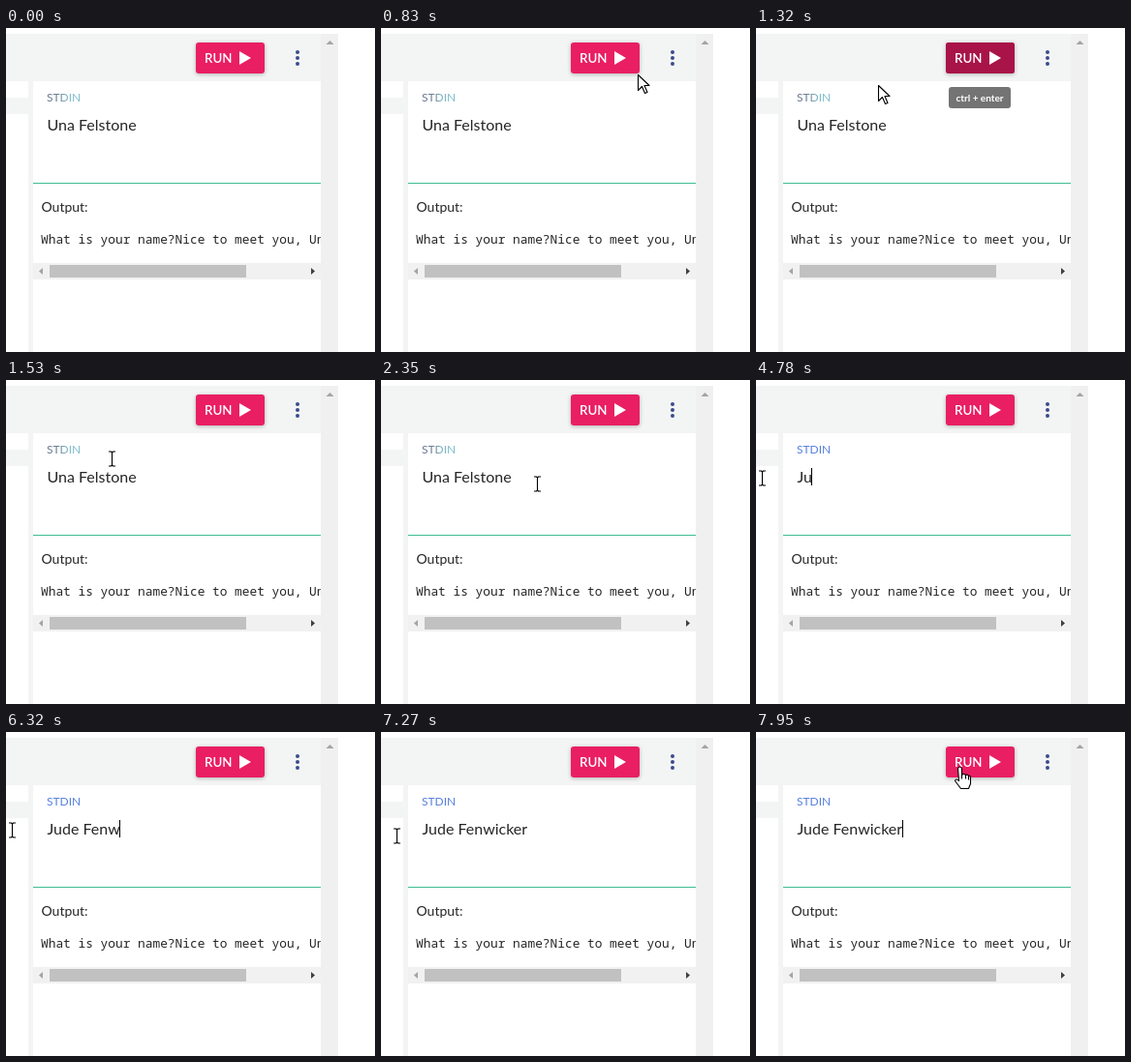
Recreate the animation shown at these times as an HTML page. Size 381 px wide and 335 px high, loop 8000 ms.

```html
<!DOCTYPE html>
<html lang="en">
<head>
<meta charset="utf-8">
<title>Run with input</title>
<style>
html, body { margin: 0; width: 100%; height: 100%; overflow: hidden; background: #fff; }
svg { display: block; width: 381px; height: 335px; font-family: Lato, sans-serif; fill: #262626; }
text { white-space: pre; }
rect { shape-rendering: crispEdges; }
.round { shape-rendering: auto; }
.field { font-size: 16px; }
#button { filter: drop-shadow(0 1px 2px #0004); }
#output { font: 12.83px "Noto Sans Mono", monospace; }
#cursor path { stroke: #000; stroke-width: 1.1; fill: #fff; stroke-linejoin: round; }
#cursor .line { fill: none; }
</style>
</head>
<body>
<svg viewBox="0 0 381 335">
  <defs>
    <clipPath id="pane"><rect x="28" y="55" width="297" height="280"/></clipPath>
    <clipPath id="selClip"><rect class="sel" y="91" height="18"/></clipPath>
    <linearGradient id="idle">
      <stop offset=".3" stop-color="#6b7a90"/>
      <stop offset=".65" stop-color="#7dbccb"/>
    </linearGradient>
  </defs>

  <!-- page frame -->
  <g fill="#f3f4f4">
    <rect y="6" width="325" height="49"/>
    <rect y="72" width="23" height="17"/>
    <rect x="23" y="55" width="5" height="280"/>
  </g>
  <rect x="325" y="6" width="18" height="329" fill="#f0f0f0"/>
  <path d="M330.5 17h8l-4-4z" fill="#a3a3a3"/>

  <!-- header -->
  <g id="button">
    <rect class="round" x="196" y="15" width="71" height="32" rx="3" fill="#e91e63"/>
    <rect class="round" id="dark" x="196" y="15" width="71" height="32" rx="3" fill="#a81448"/>
  </g>
  <text x="205" y="36" font-size="13.3" font-weight="600" fill="#fff">RUN</text>
  <path d="M241 24v14l12-7z" fill="#fff"/>
  <path d="M301 25v14" stroke="#3a4a8c" stroke-width="4" stroke-linecap="round" stroke-dasharray="0 6"/>

  <!-- input -->
  <text id="label" x="42" y="76" font-size="12">STDIN</text>
  <rect class="sel" y="91" height="18" fill="#3390ff"/>
  <text id="entry" class="field" x="42.5" y="106"></text>
  <text id="marked" class="field" x="42.5" y="106" fill="#fff" clip-path="url(#selClip)"></text>
  <rect id="caret" y="91" width="1" height="18" fill="#000"/>
  <rect x="28" y="160" width="297" height="1" fill="#3dbd95"/>

  <!-- output -->
  <text x="36.5" y="190" font-size="14">Output:</text>
  <g clip-path="url(#pane)"><text id="output" x="36" y="223"></text></g>
  <rect x="28" y="243" width="297" height="17" fill="#f1f1f1"/>
  <rect x="45" y="245" width="203" height="13" fill="#c1c1c1"/>
  <path d="M38 248v7l-4-3.5z" fill="#a3a3a3"/>
  <path d="M315 248v7l4-3.5z" fill="#404040"/>

  <g id="tip">
    <rect class="round" x="199" y="61" width="64" height="22" rx="3" fill="#747474"/>
    <text x="231" y="76" font-size="10" font-weight="700" fill="#fff" text-anchor="middle">ctrl + enter</text>
  </g>

  <g id="cursor">
    <path id="arrow" d="M0 0v16l4-4 3 7 2.500-1-3-7h5z"/>
    <path id="beam" class="line" d="M-3.500-7.500h2.500l1 1 1-1h2.500M0-6.500v13M-3.500 7.500h2.500l1-1 1 1h2.500"/>
    <g id="hand">
      <path d="M-2 1q2-3 4 0v7q2-2 4 0q2-1 3 1q2-1 2 2v6l-2 5h-8l-6-8q1-3 4 0z"/>
      <path class="line" d="M2 8v4M6 8v4M9 9v4"/>
    </g>
  </g>
</svg>
<script>
const LOOP = 8000, TICK = 70, PRESS = 2420, FIRST_KEY = 3920, TYPING = 4780;
const oldName = 'Una Felstone';
const bursts = ['u', 'de ', 'Fe', 'n', 'wicker'];
const $ = id => document.getElementById(id);
const clamp = (v, lo, hi) => Math.min(hi, Math.max(lo, v));
const ramp = (t, a, b) => clamp((t - a) / (b - a), 0, 1);
const within = (t, a, b) => t >= a && t < b;
const show = (el, on) => el.style.display = on ? '' : 'none';

// Each move curves on from where the one before it ended.
const entry = [352, 320];
const moves = [
  { start: 270, ticks: 11, bend: [320, 10], to: [212, 38] },
  { start: 1040, ticks: 11, bend: [44, 61], to: [150, 117] },
  { start: 2000, ticks: 5, bend: [180, 114], to: [161, 107] },
  { start: 2350, ticks: 6, bend: [110, 106], to: [6, 101] },
  { start: 7200, ticks: 4, bend: [25, 117], to: [45, 101] },
  { start: 7600, ticks: 5, bend: [120, 95], to: [210, 36] }
];

function pointerAt(t) {
  let at = entry;
  for (const { start, ticks, bend, to } of moves) {
    const k = clamp(Math.floor((t - start) / TICK) / ticks, 0, 1), r = 1 - k;
    at = at.map((from, i) => r * r * from + 2 * r * k * bend[i] + k * k * to[i]);
  }
  return at;
}

// After the first letter, bursts of typing follow each other in a steady rhythm.
function textAt(t) {
  if (t < FIRST_KEY) return oldName;
  const slip = within(t, 4180, 4580) ? 'i' : '';
  return 'J' + slip + bursts.map((burst, i) => {
    const since = t - TYPING - i * 385;
    return burst.slice(0, Math.max(0, Math.floor(since / 80) + 1));
  }).join('');
}

function drawPointer(t, x, y) {
  const onButton = within(x, 196, 267) && within(y, 15, 47);
  const onText = !onButton && within(y, 80, 155) && x < 325;
  show($('cursor'), t >= moves[0].start);
  $('cursor').setAttribute('transform', `translate(${Math.round(x) + .5} ${Math.round(y) + .5})`);
  show($('hand'), onButton);
  show($('beam'), onText);
  show($('arrow'), !onButton && !onText);
}

function drawField(t, x) {
  const selecting = within(t, PRESS, FIRST_KEY);
  $('label').setAttribute('fill', t >= PRESS ? '#5580dc' : 'url(#idle)');
  $('entry').textContent = textAt(t);
  const end = Math.round(42 + $('entry').getComputedTextLength());
  const start = clamp(x, 42, end);
  for (const r of document.querySelectorAll('.sel')) {
    r.setAttribute('x', start);
    r.setAttribute('width', selecting ? end - start : 0);
  }
  show($('marked'), selecting);
  $('caret').setAttribute('x', end);
  show($('caret'), t >= FIRST_KEY && !within(t, 7250, 7750));
}

function draw(t) {
  const [x, y] = pointerAt(t);
  const fade = 1 - ramp(t, 1340, 1520);
  $('dark').style.opacity = ramp(t, 860, 1040) * fade;
  $('tip').style.opacity = ramp(t, 900, 1040) * fade;
  drawField(t, x);
  drawPointer(t, x, y);
}

$('marked').textContent = oldName;
$('output').textContent = `What is your name?Nice to meet you, ${oldName}`;
const begin = performance.now();
function tick() {
  draw((performance.now() - begin) % LOOP);
  requestAnimationFrame(tick);
}
tick();
</script>
</body>
</html>
```
